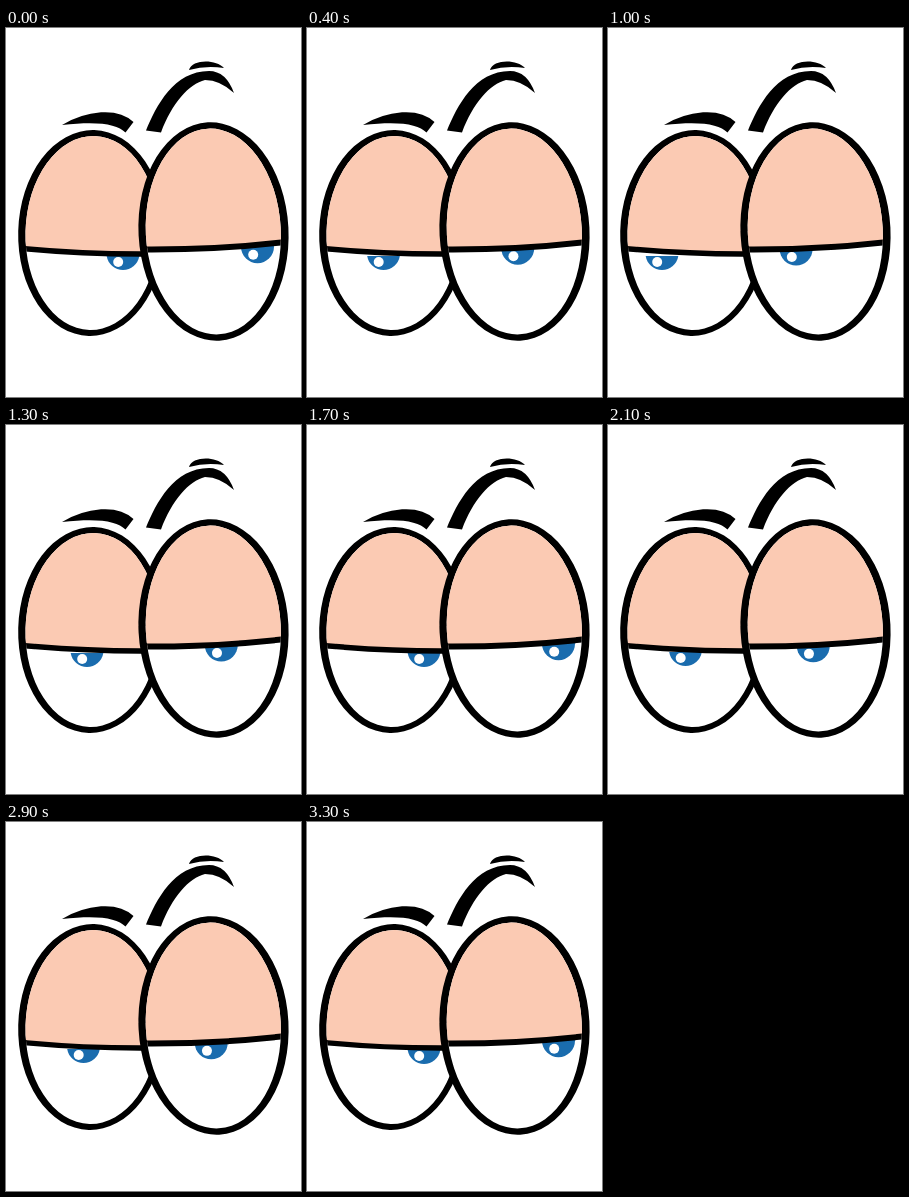
An HTML page for the animation above (3400 ms loop, 295x369 px).

```html
<!DOCTYPE html>
<html lang="en">
<head>
<meta charset="utf-8">
<title>Shifty eyes</title>
<style>
html, body { margin: 0; width: 100%; height: 100%; overflow: hidden; background: #fff; }
svg { display: block; width: 295px; height: 369px; }
</style>
</head>
<body>
<svg viewBox="0 0 295 369">
  <defs>
    <ellipse id="ballL" cx="86" cy="205" rx="66.500" ry="97" transform="rotate(1.500 86 205)"/>
    <ellipse id="ballR" cx="207.300" cy="203.500" rx="67.500" ry="103" transform="rotate(-3 207.300 203.500)"/>
    <clipPath id="clipL"><use href="#ballL"/></clipPath>
    <clipPath id="clipR"><use href="#ballR"/></clipPath>
  </defs>

  <path d="M56 97Q74 86 95 84.300Q116 83 127.500 94L119.500 104.500C111 96 92 93 56 97Z"/>
  <path d="M140 102.500C150 78 168 43 203 43Q220 43 228 65Q214 52 199 52C183 56 166 75 155 104.500Z"/>
  <path d="M183 42C186 31 210 31 218 40Q200 37 183 42Z"/>

  <!-- rims are a little heavier at the sides than at top and bottom -->
  <ellipse cx="85.500" cy="205" rx="73.300" ry="103" transform="rotate(1.500 85.500 205)"/>
  <use href="#ballL" fill="#fff"/>
  <g clip-path="url(#clipL)">
    <g id="irisL">
      <path d="M-16.300 2.500A16.500 16.500 0 0 0 16.300 2.500Z" fill="#1a6cae"/>
      <circle cx="-4.800" cy="8.500" r="5" fill="#fff"/>
    </g>
    <path d="M0 90H160V226Q75 226 10 219.500H0Z" fill="#fbcab3"/>
    <path d="M10 219.800Q75 226.300 140 226" fill="none" stroke="#000" stroke-width="5.400"/>
  </g>

  <ellipse cx="207.500" cy="203.500" rx="75" ry="109.300" transform="rotate(-3 207.500 203.500)"/>
  <use href="#ballR" fill="#fff"/>
  <g clip-path="url(#clipR)">
    <g id="irisR">
      <circle r="16.500" fill="#1a6cae"/>
      <circle cx="-4.300" cy="8" r="5" fill="#fff"/>
    </g>
    <path d="M120 80H295V213L284 213.500Q210 222.500 130 221.500H120Z" fill="#fbcab3"/>
    <path d="M130 221.500Q210 222.500 284 213.500" fill="none" stroke="#000" stroke-width="6"/>
  </g>
</svg>
<script>
const STEP = 100, STEPS = 34;
// iris centres: left x, left y, right x, right y
const aside = [117, 225.5, 251.5, 218.7];
const across = [36, 225.5, 170, 221.7];
const farAcross = [38, 223.5, 159, 223];
const glance = [
  [0, aside], [8, across], [17, aside], [25, farAcross], [33, aside]
];
const irisL = document.getElementById('irisL');
const irisR = document.getElementById('irisR');

function gazeAt(step) {
  const i = Math.max(1, glance.findIndex(([at]) => at >= step));
  const [start, from] = glance[i - 1], [end, to] = glance[i];
  const k = (step - start) / (end - start);
  return from.map((v, n) => v + (to[n] - v) * k);
}

function place(iris, x, y) {
  iris.setAttribute('transform', `translate(${x} ${y})`);
}

function draw() {
  const step = Math.floor(performance.now() / STEP) % STEPS;
  const [lx, ly, rx, ry] = gazeAt(step);
  place(irisL, lx, ly);
  place(irisR, rx, ry);
  requestAnimationFrame(draw);
}
draw();
</script>
</body>
</html>
```
